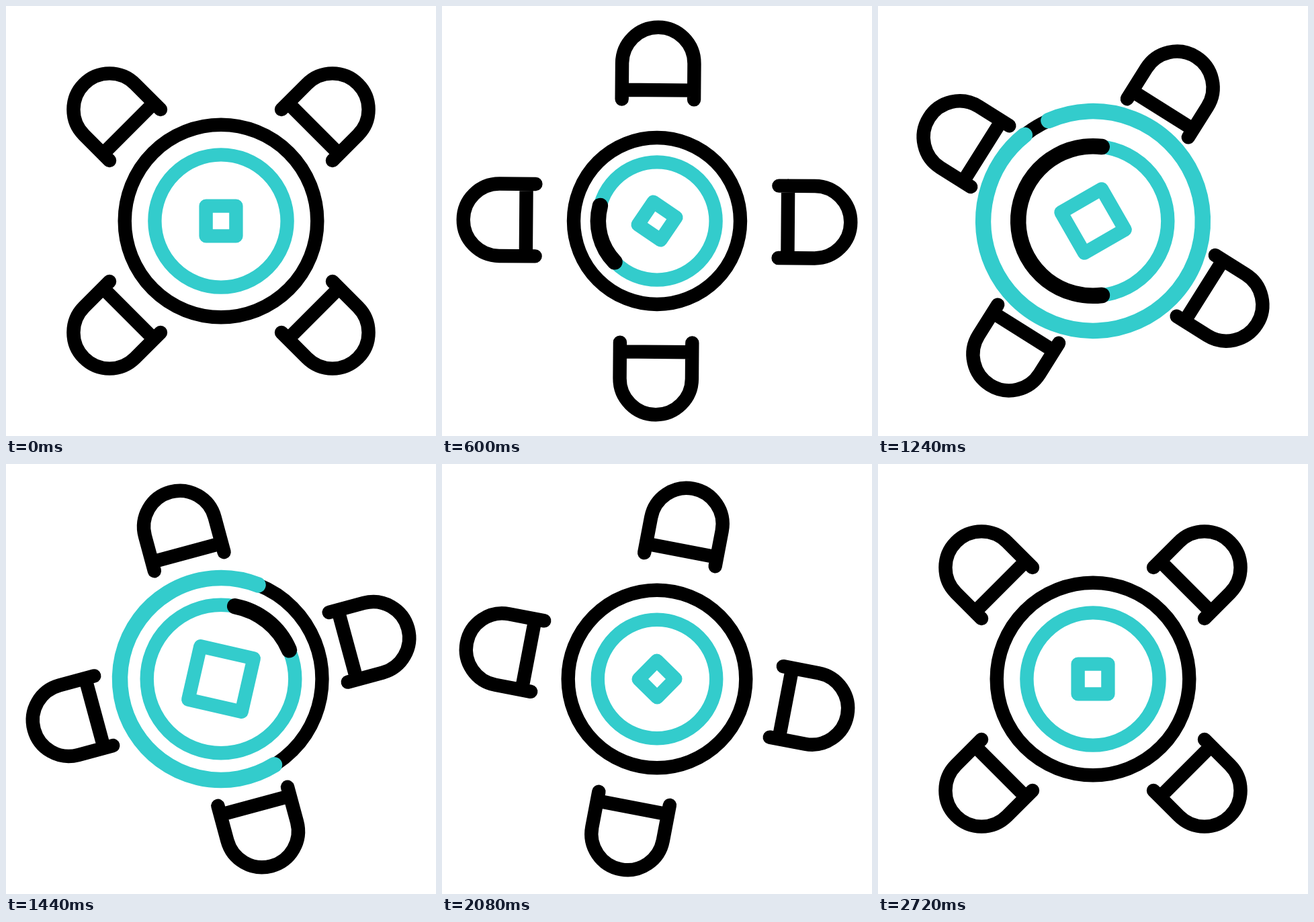
These frames come from a looping animation (640x640 px, 3 s). An HTML page with a canvas:

```html
<!DOCTYPE html>
<html>
<head>
<meta charset="utf-8">
<style>
  html, body { margin: 0; width: 100%; height: 100%; overflow: hidden; background: #fff; }
  canvas { display: block; width: 100vmin; height: 100vmin; }
</style>
</head>
<body>
<canvas width="640" height="640"></canvas>
<script>
const ctx = document.querySelector('canvas').getContext('2d');
const LOOP = 3000, STEP = 40, TURN = Math.PI * 2, DEG = Math.PI / 180;
const BLACK = '#000', TEAL = '#33cccc';
const LINE = 20.4, OVERLAY_LINE = 23.5;

// Eased progress from 0 to 1
function ease(t, start, duration) {
  const u = Math.min(1, Math.max(0, (t - start) / duration));
  return u * u * (3 - 2 * u);
}

// Shrink, swell, shrink and return, each leg lasting 600 ms
function pulse(t, start, dip, peak) {
  const leg = i => ease(t, start + i * 600, 600);
  return dip * (leg(0) - leg(3)) + (peak - dip) * (leg(1) - leg(2));
}

function stroke(color, width = LINE) {
  ctx.strokeStyle = color;
  ctx.lineWidth = width;
  ctx.stroke();
}

function ring(radius, color, from = 0, to = TURN, width = LINE) {
  ctx.beginPath();
  ctx.arc(0, 0, radius, from, to);
  stroke(color, width);
}

// Arc that is drawn on by its head and erased by its tail
function sweep(radius, color, angle, head, tail) {
  if (head > tail) {
    ring(radius, color, angle + tail * TURN, angle + head * TURN, OVERLAY_LINE);
  }
}

function chair() {
  const half = 53.7;
  ctx.beginPath();
  ctx.moveTo(-half, -181);
  ctx.lineTo(-half, -234.6);
  ctx.arc(0, -234.6, half, Math.PI, TURN);
  ctx.lineTo(half, -181);
  ctx.moveTo(-half, -194.8);
  ctx.lineTo(half, -194.8);
  stroke(BLACK);
}

function draw(t) {
  ctx.setTransform(1, 0, 0, 1, 0, 0);
  ctx.fillStyle = '#fff';
  ctx.fillRect(0, 0, 640, 640);
  ctx.translate(320, 320);
  ctx.lineCap = ctx.lineJoin = 'round';

  ctx.save();
  ctx.rotate(TURN * (ease(t, 40, 2520) + 1 / 8));
  for (let i = 0; i < 4; i++) {
    chair();
    ctx.rotate(TURN / 4);
  }
  ctx.restore();

  const outer = 143.3 + pulse(t, 8, -19.3, 20.4);
  ring(outer, BLACK);
  sweep(outer, TEAL, (86.5 + 360 * ease(t, 260, 2160)) * DEG,
    ease(t, 700, 600), ease(t, 1200, 600));

  const inner = 98.6 + pulse(t, 126, -12.4, 14.2);
  ring(inner, TEAL);
  sweep(inner, BLACK, (118 + 525 * ease(t, 320, 2520)) * DEG,
    ease(t, 414, 725), ease(t, 896, 725));

  const half = 22.4 + pulse(t, 246, -3.1, 18.3);
  ctx.rotate(TURN * ease(t, 120, 2520));
  ctx.beginPath();
  ctx.rect(-half, -half, 2 * half, 2 * half);
  stroke(TEAL);
}

function frame() {
  const t = performance.now() % LOOP;
  draw(Math.floor(t / STEP) * STEP);
  requestAnimationFrame(frame);
}
frame();
</script>
</body>
</html>
```
